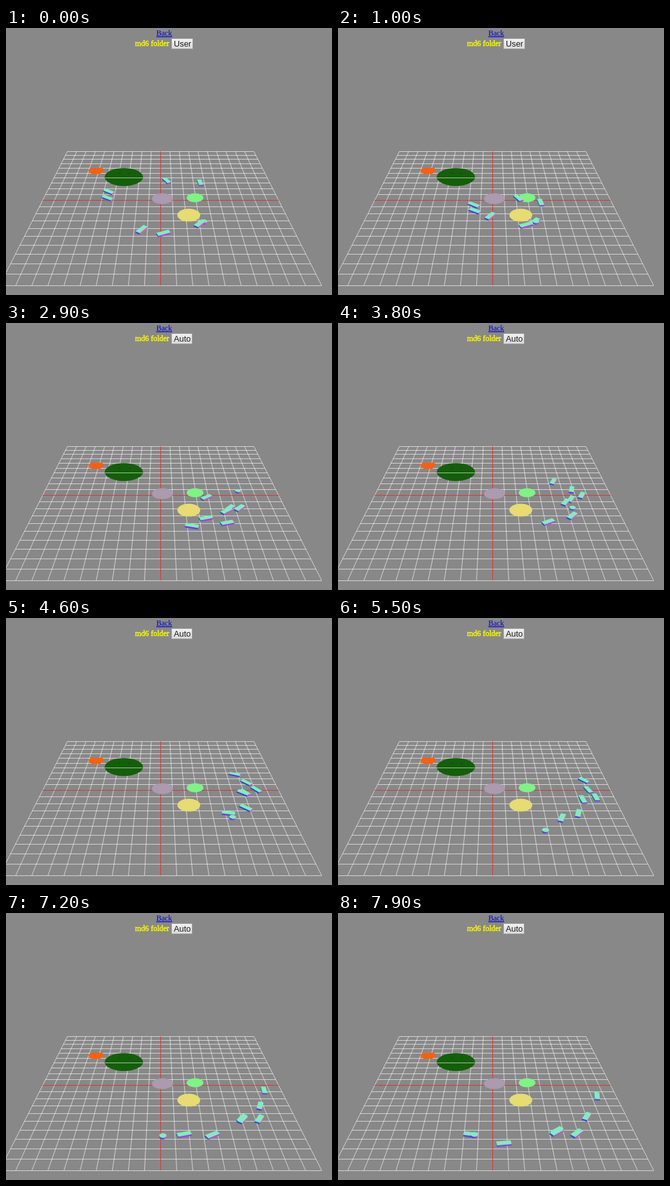
These frames come from a looping animation (507x416 px, 8000 ms). An HTML page with a canvas:

```html
<!DOCTYPE html>
<html lang="en">
<head>
<meta charset="utf-8">
<title>Steering demo</title>
<style>
  html, body { margin: 0; width: 100%; height: 100%; overflow: hidden; background: #888; }
  canvas, svg { position: absolute; left: 0; top: 0; }
  text { font: 12px "Liberation Serif", "Times New Roman", serif; }
  #label { font: 12.8px "Liberation Sans", Arial, sans-serif; fill: #1c1c1c; }
</style>
</head>
<body>
<canvas id="stage" width="507" height="416"></canvas>
<svg width="507" height="416">
  <defs>
    <linearGradient id="face" x2="0" y2="1">
      <stop offset="0" stop-color="#f2f2f2"/>
      <stop offset="1" stop-color="#dadada"/>
    </linearGradient>
  </defs>
  <text x="233.7" y="12" fill="#0000d8" text-decoration="underline">Back</text>
  <text x="200.8" y="28" fill="#ff0" stroke="#ff0" stroke-width=".4">md6 folder</text>
  <rect id="button" x="257.5" y="16.5" width="33" height="16" fill="url(#face)" stroke="#a0a0a0"/>
  <text id="label" x="261" y="29">User</text>
</svg>
<script>
const LOOP = 8, STEP = 0.1, SWITCH = 1.4, TURN = 2, END = 7.9;
const ctx = document.getElementById('stage').getContext('2d');
const button = document.getElementById('button');
const label = document.getElementById('label');

// Camera: looks at the origin, pitched down; z points towards the viewer.
const SIN = 0.528, COS = 0.849, FOCAL = 585, DIST = 31.85;
const CX = 240.5, CY = 268.9, EYE_Z = 27;

// Walkers on the floor: start, turning point, and final orbit [radius, degrees].
const WALKERS = [
  { start: [-4.55, -1.46], turn: [1.43, 2.88], orbit: [7.7, 54] },
  { start: [-4.54, -0.39], turn: [1.65, 3.57], orbit: [6.7, 103] },
  { start: [0.56, -3.45], turn: [3.81, 2.71], orbit: [7.6, 53] },
  { start: [3.62, -3.09], turn: [4.43, 3.73], orbit: [7.5, 84] },
  { start: [3, 3.4], turn: [3.5, 2.8], orbit: [8.3, 32] },
  { start: [-1.43, 4.16], turn: [1.05, 0.55], orbit: [8.6, 11] },
  { start: [0.21, 4.63], turn: [4.85, 2.53], orbit: [8.7, 47] }
];

const clamp = u => Math.min(1, Math.max(0, u));
const smooth = u => u * u * (3 - 2 * u);
const mix = (a, b, u) => a + (b - a) * u;

function polar(r, deg) {
  const a = deg * Math.PI / 180;
  return [r * Math.cos(a), r * Math.sin(a)];
}

// The flock sweeps round as a fan that narrows, then spreads out again.
function fanAngle(deg, t) {
  const left = END - t;
  return deg * (0.53 + 0.082 * (t - 5.5) ** 2) - 3.5 * left - 1.6 * left * left;
}

// A straight run to the turning point, then a spiral out to the orbit.
function walkerAt({ start, turn, orbit }, t) {
  if (t <= TURN) return start.map((v, i) => mix(v, turn[i], t / TURN));
  const swing = smooth(clamp((t - TURN) / 2.4));
  const reach = 1 - (1 - clamp((t - TURN) / 4.5)) ** 2;
  const turnDeg = Math.atan2(turn[1], turn[0]) * 180 / Math.PI;
  return polar(mix(Math.hypot(...turn), orbit[0], reach),
               mix(turnDeg, fanAngle(orbit[1], t), swing));
}

function goalAt(t) {
  if (t < SWITCH) return [3.36, 3.15];
  const u = t - TURN;
  return polar(6.7, -30 + 27.5 * u - 0.9 * u * u);
}

function project(x, y, z) {
  const k = FOCAL / (DIST - z * COS - y * SIN);
  return [CX + x * k, CY - (y * COS - z * SIN) * k];
}

function fill(points, color) {
  ctx.beginPath();
  points.forEach(p => ctx.lineTo(...p));
  ctx.closePath();
  ctx.fillStyle = color;
  ctx.fill();
}

// Colour follows the face normal as seen by the camera.
function shade(x, y, z) {
  const n = [x, y * COS - z * SIN, y * SIN + z * COS];
  return `rgb(${n.map(v => Math.round(127.5 + 127.5 * v))})`;
}

function prism(base) {
  const half = 0.075;
  base.forEach(([x0, z0], i) => {
    const [x1, z1] = base[(i + 1) % base.length];
    const len = Math.hypot(x1 - x0, z1 - z0);
    const nx = (z1 - z0) / len, nz = (x0 - x1) / len;
    if (nx * -x0 + nz * (EYE_Z - z0) <= 0) return;
    fill([project(x0, half, z0), project(x1, half, z1),
          project(x1, -half, z1), project(x0, -half, z0)], shade(nx, 0, nz));
  });
  fill(base.map(([x, z]) => project(x, half, z)), shade(0, 1, 0));
}

// A box that points the way it has just moved.
function boxBase(walker, t) {
  const [x, z] = walkerAt(walker, t);
  const [px, pz] = walkerAt(walker, t - STEP);
  const len = Math.hypot(x - px, z - pz);
  const dx = (x - px) / len, dz = (z - pz) / len;
  return [[-0.5, -0.2], [0.5, -0.2], [0.5, 0.2], [-0.5, 0.2]]
    .map(([l, w]) => [x + l * dx - w * dz, z + l * dz + w * dx]);
}

function discBase([x, z]) {
  return Array.from({ length: 20 }, (_, i) => {
    const [dx, dz] = polar(0.25, i * 18);
    return [x + dx, z + dz];
  });
}

function line(p, q, color) {
  ctx.beginPath();
  ctx.moveTo(...p);
  ctx.lineTo(...q);
  ctx.strokeStyle = color;
  ctx.stroke();
}

function gridLine(i, color) {
  line(project(i, 0, -10), project(i, 0, 10), color);
  const [x0, y] = project(-10, 0, i), [x1] = project(10, 0, i);
  const row = Math.floor(y) + 0.5;
  line([x0, row], [x1, row], color);
}

function ellipse(x, y, rx, ry, color) {
  ctx.beginPath();
  ctx.ellipse(x, y, rx, ry, 0, 0, 7);
  ctx.fillStyle = color;
  ctx.fill();
}

function drawFloor() {
  for (let i = -10; i <= 10; i++) if (i) gridLine(i, 'rgba(255,255,255,.64)');
  gridLine(0, '#d63838');
  fill([[128, 221.5], [131, 218], [150, 218], [152.3, 221.5], [149, 225.5],
        [146, 227.2], [134, 227.2], [130, 225.5]], '#ff5f0a');
  ellipse(183.3, 232.2, 29.8, 14, '#145f0a');
  line([154, 233.5], [212.5, 233.5], 'rgba(210,230,205,.75)');
  line([176, 227], [178, 225.5], '#0a3a05');
  line([191, 227], [193, 225.5], '#0a3a05');
  ellipse(243, 266, 16, 8.5, '#ab9ab0');
  ellipse(294, 264.5, 13, 6.9, '#7cf584');
  ellipse(284.3, 291.6, 17.8, 10, '#e6dc70');
}

function draw(t) {
  ctx.fillStyle = '#888';
  ctx.fillRect(0, 0, 507, 416);
  drawFloor();
  const depth = base => base.reduce((sum, p) => sum + p[1], 0) / base.length;
  WALKERS.map(w => boxBase(w, t))
    .concat([discBase(goalAt(t))])
    .sort((a, b) => depth(a) - depth(b))
    .forEach(prism);

  const auto = t >= SWITCH;
  label.textContent = auto ? 'Auto' : 'User';
  button.setAttribute('width', auto ? 32 : 33);
}

const start = performance.now();
function tick() {
  const t = (performance.now() - start) / 1000 % LOOP;
  draw(Math.floor(t / STEP) * STEP);
  requestAnimationFrame(tick);
}
tick();
</script>
</body>
</html>
```
